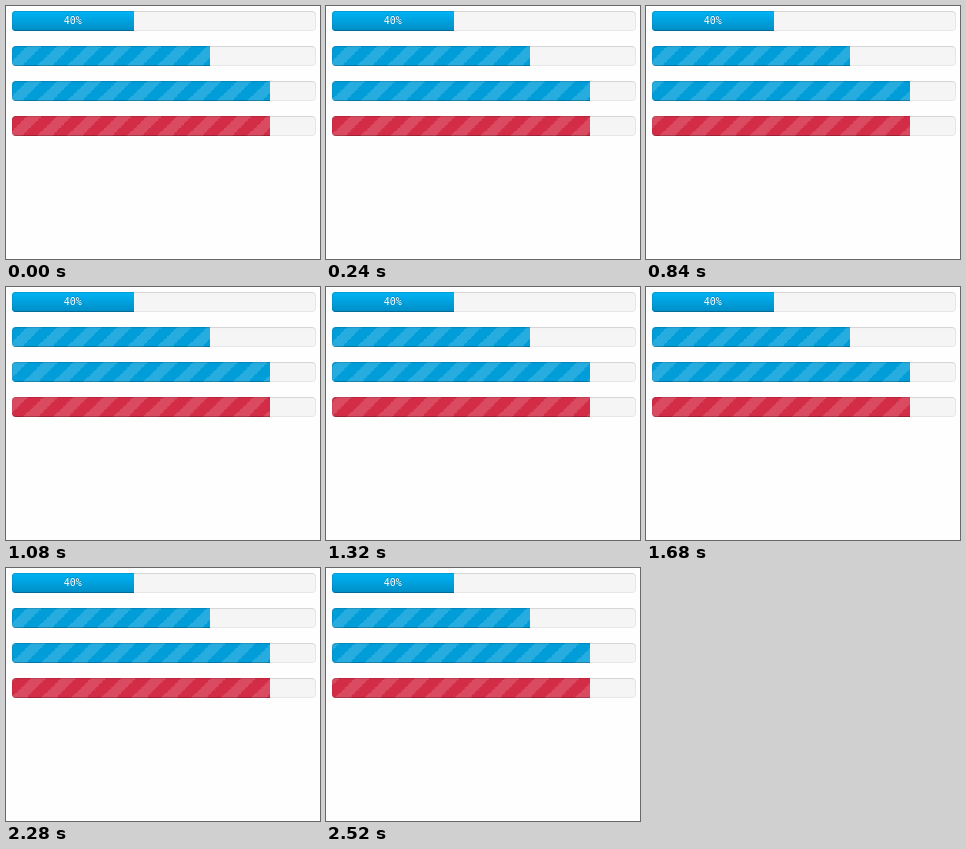
Write an HTML page that moves like this. It is 314 px wide and 253 px high and loops after 2.62 s.

```html
<!DOCTYPE html>
<html lang="en">
<head>
<meta charset="utf-8">
<title>Progress bars</title>
<style>
html, body { margin: 0; width: 100%; height: 100%; overflow: hidden; background: #fefefe; }
.progress {
  position: absolute; left: 6px; width: 304px; height: 20px;
  overflow: hidden; border-radius: 4px; background: #f5f5f5;
}
.progress::after {
  content: ""; position: absolute; inset: 0; border-radius: 4px;
  box-shadow: inset 0 0 0 1px rgba(0,0,0,.06), inset 0 1px 1px rgba(0,0,0,.08);
}
.bar {
  height: 100%; background-color: #009dd8; color: #fff; text-align: center;
  font: 10px/20px "DejaVu Sans Mono", monospace;
  text-shadow: 0 -1px 0 rgba(0,0,0,.2);
  box-shadow: inset 0 -1px 0 rgba(0,0,0,.2);
}
.plain { background-image: linear-gradient(#00b4f5, #008dc5); }
.striped {
  background-image: linear-gradient(-45deg,
    rgba(255,255,255,.15) 25%, transparent 25%, transparent 50%,
    rgba(255,255,255,.15) 50%, rgba(255,255,255,.15) 75%, transparent 75%);
  background-size: 30px 30px;
}
.danger { background-color: #d32c46; }
</style>
</head>
<body>
<div class="progress" style="top:5px"><div class="bar plain" style="width:40%">40%</div></div>
<div class="progress" style="top:40px"><div class="bar striped" style="width:65%"></div></div>
<div class="progress" style="top:75px"><div class="bar striped active" style="width:85%"></div></div>
<div class="progress" style="top:110px"><div class="bar striped danger active" style="width:85%"></div></div>
<script>
const LOOP = 2620, STEP = 120, SHIFT = 1.8, START = 0;
const count = Math.ceil(LOOP / STEP);
const place = i => `${(START + i * SHIFT).toFixed(2)}px 0`;
const frames = Array.from({ length: count }, (_, i) => ({
  offset: i * STEP / LOOP, backgroundPosition: place(i), easing: 'step-end'
}));
frames.push({ offset: 1, backgroundPosition: place(count - 1) });
for (const bar of document.querySelectorAll('.active'))
  bar.animate(frames, { duration: LOOP, iterations: Infinity });
</script>
</body>
</html>
```
